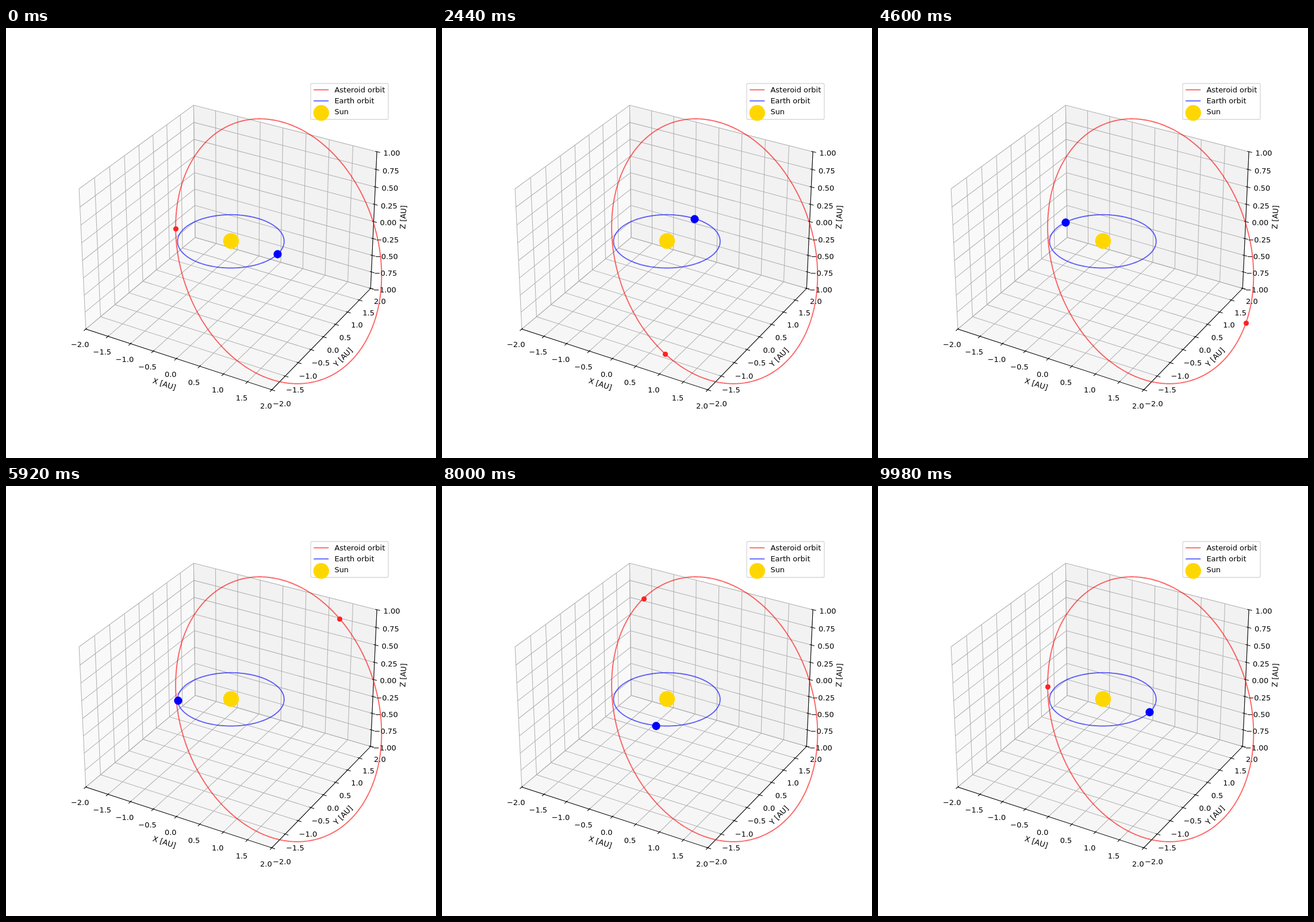
Recreate the animation shown at these times as an HTML page. Size 748x748 px, loop 10000 ms.

```html
<!DOCTYPE html>
<html lang="en">
<head>
<meta charset="utf-8">
<title>Orbits</title>
<style>
html, body { margin: 0; width: 100%; height: 100%; overflow: hidden; background: #fff; }
svg { display: block; width: 748px; height: 748px; }
text { font-family: "DejaVu Sans", sans-serif; font-size: 12.99px; fill: #000; }
</style>
</head>
<body>
<svg id="stage" viewBox="0 0 748 748"></svg>
<script>
const stage = document.getElementById("stage");
const TAU = 2 * Math.PI, RAD = Math.PI / 180;
const PT = 748 / 576;
const STEPS = 500, STEP_MS = 20;

function add(tag, attrs, text) {
  const el = document.createElementNS("http://www.w3.org/2000/svg", tag);
  for (const k in attrs) el.setAttribute(k, attrs[k]);
  if (text) el.textContent = text;
  stage.appendChild(el);
  return el;
}

// Perspective view: elevation 30, azimuth -60, box proportions 4:4:3
const AXES = 0.77 * 748, SCALE = AXES / 0.185;
const CX = 0.1275 * 748 + 0.095 * SCALE, CY = 0.89 * 748 - 0.095 * SCALE;
const UNIT = 0.297624;
const COS30 = Math.cos(30 * RAD);

function project([x, y, z]) {
  const side = UNIT * (COS30 * x + 0.5 * y);
  const back = UNIT * (COS30 * y - 0.5 * x);
  const up = UNIT * 1.5 * z;
  const k = SCALE / (10 + COS30 * back - 0.5 * up);
  return [CX + side * k, CY - (0.5 * back + COS30 * up) * k];
}

function path(points, attrs, close) {
  const d = "M" + points.map(p => project(p).map(v => v.toFixed(2)).join(" ")).join("L");
  return add("path", { d: d + (close ? "Z" : ""), fill: "none", ...attrs });
}

function range(from, to, step) {
  const out = [];
  for (let v = from; v <= to + 1e-9; v += step) out.push(v);
  return out;
}

const thin = { stroke: "#b0b0b0", "stroke-width": 0.8 * PT };
const black = { stroke: "#000", "stroke-width": 0.8 * PT };
const ticks = range(-2, 2, 0.5), zTicks = range(-1, 1, 0.25);

function drawBox() {
  path([[-2, -2, -1], [-2, 2, -1], [-2, 2, 1], [-2, -2, 1]], { fill: "#f9f9f9" }, true);
  path([[-2, 2, -1], [2, 2, -1], [2, 2, 1], [-2, 2, 1]], { fill: "#f2f2f2" }, true);
  path([[-2, -2, -1], [2, -2, -1], [2, 2, -1], [-2, 2, -1]], { fill: "#f6f6f6" }, true);
  for (const v of ticks) {
    path([[v, -2, -1], [v, 2, -1], [v, 2, 1]], thin);
    path([[2, v, -1], [-2, v, -1], [-2, v, 1]], thin);
  }
  for (const v of zTicks) path([[-2, -2, v], [-2, 2, v], [2, 2, v]], thin);
}

function tickLabel(pos, value, digits) {
  const [x, y] = project(pos);
  const label = Math.abs(value).toFixed(digits);
  add("text", { x, y: Math.round(y + 10.2), "text-anchor": "middle" }, (value < 0 ? "\u2212" : "") + label);
}

function axisLabel(pos, from, to, text) {
  const [x, y] = project(pos), a = project(from), b = project(to);
  const turn = Math.atan2(b[1] - a[1], b[0] - a[0]) / RAD;
  add("text", { y: 1, "text-anchor": "middle", transform: `translate(${x} ${y}) rotate(${turn})` }, text);
}

function drawAxes() {
  const a = [-2, -2, -1], b = [2, -2, -1], c = [2, 2, -1], d = [2, 2, 1];
  const out = 0.2 / 3, inn = 0.1 / 3, gap = 0.2075, pad = 0.4509;
  path([a, b], black);
  path([b, c], black);
  path([c, d], black);
  for (const v of ticks) {
    path([[v, -2 - out, -1], [v, -2 + inn, -1]], black);
    tickLabel([v, -2 - gap, -1 - gap / 2], v, 1);
    path([[2 + out, v, -1], [2 - inn, v, -1]], black);
    tickLabel([2 + gap, v, -1 - gap / 2], v, 1);
  }
  for (const v of zTicks) {
    path([[2 + out, 2, v], [2 - inn, 2, v]], black);
    tickLabel([2 + gap, 2 + gap, v], v, 2);
  }
  axisLabel([0, -2 - pad, -1 - pad / 2], a, b, "X [AU]");
  axisLabel([2 + pad, 0, -1 - pad / 2], b, c, "Y [AU]");
  axisLabel([2 + pad, 2 + pad, 0], c, d, "Z [AU]");
}

// Position on a Kepler ellipse at a true anomaly
function orbit(a, e, inc, node, peri) {
  const ci = Math.cos(inc * RAD), si = Math.sin(inc * RAD);
  const cn = Math.cos(node * RAD), sn = Math.sin(node * RAD);
  return nu => {
    const r = a * (1 - e * e) / (1 + e * Math.cos(nu));
    const u = nu + peri * RAD, cu = r * Math.cos(u), su = r * Math.sin(u);
    return [cn * cu - sn * su * ci, sn * cu + cn * su * ci, su * si];
  };
}

const asteroid = orbit(2.196, 0.488, 52.1, 62.3, 159.6);
const earth = orbit(1, 0, 0, 0, 0);

function drawOrbit(body, color) {
  const points = range(0, 360, 1).map(v => body(v * RAD));
  path(points, { stroke: color, "stroke-opacity": 0.6, "stroke-width": 1.5 * PT, "stroke-linejoin": "round" });
}

function place(dot, pos) {
  const [x, y] = project(pos);
  dot.setAttribute("cx", Math.round(x) + 0.5);
  dot.setAttribute("cy", Math.round(y) + 0.5);
}

function drawLegend() {
  add("rect", { x: 530, y: 96.5, width: 135, height: 62.5, rx: 2.6, fill: "#fff", "fill-opacity": 0.8,
    stroke: "#ccc", "stroke-opacity": 0.8, "stroke-width": PT });
  const line = (y, stroke) => add("path", { d: `M535.2 ${y}H561.2`, stroke, "stroke-opacity": 0.6, "stroke-width": 1.5 * PT });
  line(107.5, "#f00");
  line(126.8, "#00f");
  add("circle", { cx: 548.3, cy: 147.7, r: 13.7, fill: "#ffd700" });
  ["Asteroid orbit", "Earth orbit", "Sun"].forEach((name, i) =>
    add("text", { x: 571.4, y: [112, 131, 150][i] + 0.3 }, name));
}

drawBox();
drawAxes();
drawOrbit(asteroid, "#f00");
drawOrbit(earth, "#00f");
place(add("circle", { r: 13.7, fill: "#ffd700" }), [0, 0, 0]);
const redDot = add("circle", { r: 3.5 * PT, fill: "#ff2222" });
const blueDot = add("circle", { r: 5.5 * PT, fill: "#00f" });
drawLegend();

function render(ms) {
  const step = Math.floor(ms / STEP_MS) % STEPS;
  const angle = TAU * step / (STEPS - 1);
  place(redDot, asteroid(angle));
  place(blueDot, earth(angle));
}

const start = performance.now();
function tick() {
  render(Math.max(0, performance.now() - start));
  requestAnimationFrame(tick);
}
render(0);
requestAnimationFrame(tick);
</script>
</body>
</html>
```
